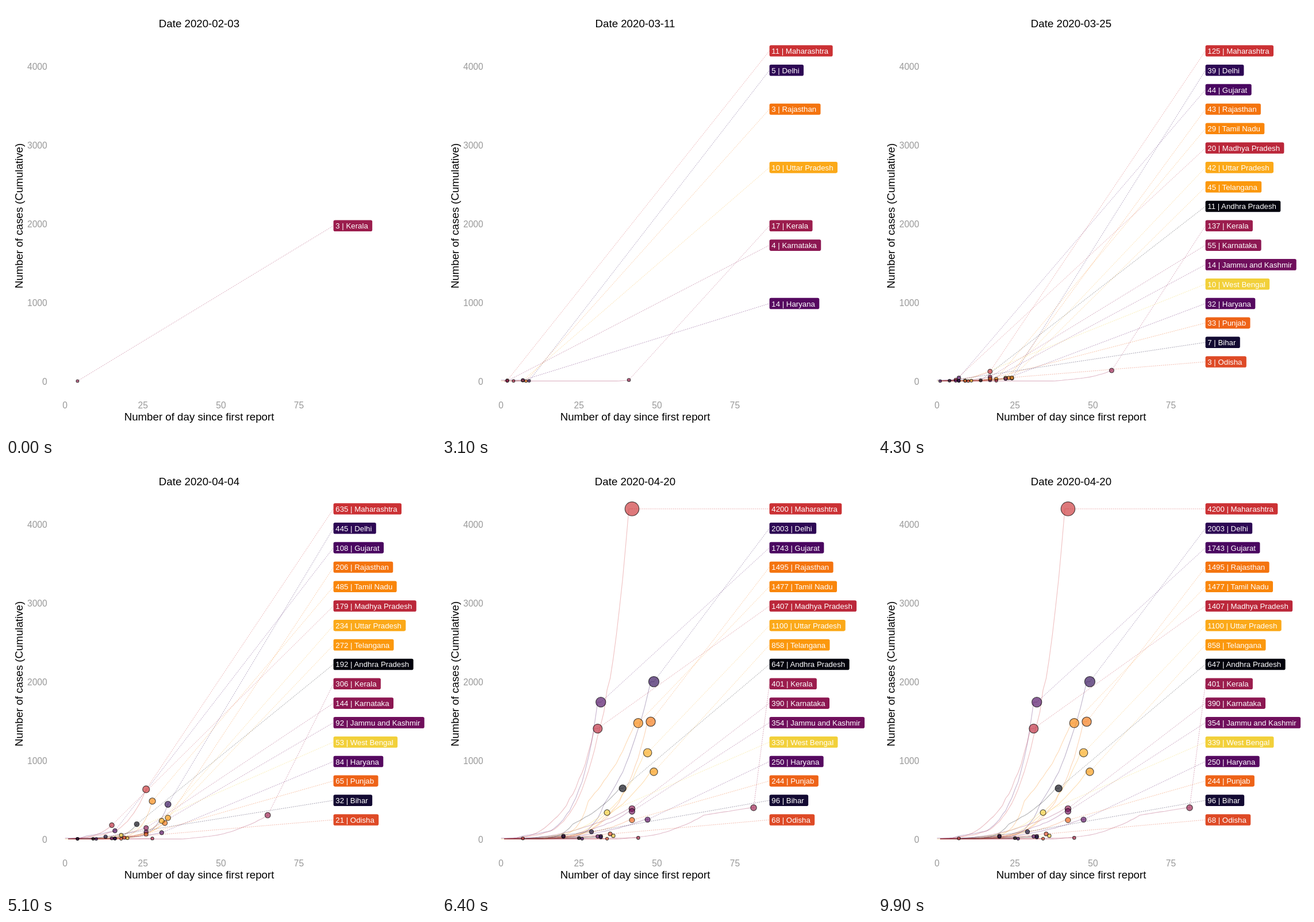
Animation, 748 px wide and 748 px high, one loop 10000 ms. Source, as an HTML page:

```html
<!DOCTYPE html>
<html lang="en">
<head>
<meta charset="utf-8">
<title>Cumulative cases by state</title>
<style>
  html, body { margin: 0; width: 100%; height: 100%; overflow: hidden; background: #fff; }
  svg { display: block; width: 748px; height: 748px; font-family: "Liberation Sans", Arial, sans-serif; }
  .title { font-size: 18.7px; text-anchor: middle; }
  .tick { font-size: 15.6px; fill: #999; text-anchor: middle; }
  .tick.y { text-anchor: end; }
  .curve { fill: none; stroke-width: 1.1; stroke-linejoin: round; opacity: .3; }
  .lead { stroke-width: .85; stroke-dasharray: 1.7 1.7; opacity: .5; }
  .dot { fill-opacity: .65; stroke: #000; stroke-opacity: .65; stroke-width: 1.2; }
  .tag { font-size: 13.25px; fill: #fff; }
</style>
</head>
<body>
<svg id="chart" viewBox="0 0 748 748">
  <text id="date" class="title" x="336" y="37.3"></text>
  <text class="title" x="336" y="721.3">Number of day since first report</text>
  <text class="title" transform="translate(29 365) rotate(-90)">Number of cases (Cumulative)</text>
</svg>
<script>
const FIRST = 4, LAST = 81;               // days after 30 January 2020
const STEP = 100, MOVING = 64, LOOP = 10000;
const KEY_DAYS = [37, 41, 56, 65, 80];
const TAG_X = 569.6, PAD = 3.7, SPACE = 3.68;

const chart = document.getElementById('chart');
const dateText = document.getElementById('date');
const px = day => 102.7 + 5.424 * day;
const py = cases => 652.8 - 0.13685 * cases;

function set(el, attrs) {
  for (const key in attrs) el.setAttribute(key, attrs[key]);
}
function make(parent, tag, attrs = {}) {
  const el = document.createElementNS('http://www.w3.org/2000/svg', tag);
  set(el, attrs);
  return parent.appendChild(el);
}

for (let v = 0; v <= 4000; v += 1000)
  make(chart, 'text', { class: 'tick y', x: 71.7, y: py(v) + 6 }).textContent = v;
for (let d = 0; d <= 75; d += 25)
  make(chart, 'text', { class: 'tick', x: px(d), y: 700 }).textContent = d;

const curves = make(chart, 'g'), leads = make(chart, 'g');
const dots = make(chart, 'g'), tags = make(chart, 'g');
const states = [];

// counts belong to the last KEY_DAYS; offset is the day of the first report
function add(name, color, offset, start, counts, first = 3) {
  const days = KEY_DAYS.slice(-counts.length);
  const s = { name, offset, start, knots: [[start, first], ...counts.map((n, i) => [days[i], n])] };
  s.curve = make(curves, 'path', { class: 'curve', stroke: color });
  s.dot = make(dots, 'circle', { class: 'dot', fill: color });
  s.parts = [s.curve, s.dot];
  if (name) {
    const y = 78 + 33.81 * states.length;
    s.lead = make(leads, 'line', { class: 'lead', stroke: color, x2: TAG_X, y2: y });
    s.tag = make(tags, 'g');
    s.box = make(s.tag, 'rect', { x: TAG_X, y: y - 9.8, height: 19.6, rx: 2.8, fill: color });
    s.text = make(s.tag, 'text', { class: 'tag', x: TAG_X + PAD, y: y + 5 });
    s.parts.push(s.lead, s.tag);
  }
  states.push(s);
}

function noise(seed) {
  const n = Math.sin(seed * 12.9898) * 43758.5453;
  return n - Math.floor(n) - 0.5;
}

// Slowing exponential growth between knots, with uneven daily reports
function casesOn(s, day) {
  const end = s.knots[s.knots.length - 1];
  if (day >= end[0]) return end[1];
  const i = Math.max(1, s.knots.findIndex(k => k[0] >= day));
  const [d0, v0] = s.knots[i - 1], [d1, v1] = s.knots[i];
  const u = (day - d0) / (d1 - d0);
  const eased = u ** 0.9 + 0.12 * u * (1 - u) * noise(day + 100 * s.offset);
  return Math.round(v0 * (v1 / v0) ** eased);
}

add('Maharashtra', '#cb3134', 39, 40, [11, 125, 635, 4200]);
add('Delhi', '#2d0754', 32, 36, [5, 39, 445, 2003]);
add('Gujarat', '#4a0760', 49, 50, [44, 108, 1743]);
add('Rajasthan', '#f4740f', 33, 40, [3, 43, 206, 1495]);
add('Tamil Nadu', '#f9860b', 37, 50, [29, 485, 1477]);
add('Madhya Pradesh', '#bb273a', 50, 51, [20, 179, 1407]);
add('Uttar Pradesh', '#fba919', 34, 34, [10, 42, 234, 1100]);
add('Telangana', '#fb980d', 32, 45, [45, 272, 858]);
add('Andhra Pradesh', '#02020c', 42, 50, [11, 192, 647]);
add('Kerala', '#9b1d4d', 0, 4, [3, 17, 137, 306, 401]);
add('Karnataka', '#8c1752', 39, 40, [4, 55, 144, 390]);
add('Jammu and Kashmir', '#700f5c', 39, 47, [14, 92, 354]);
add('West Bengal', '#f2d03a', 47, 51, [10, 53, 339]);
add('Haryana', '#560960', 34, 34, [14, 32, 84, 250], 14);
add('Punjab', '#ee6318', 39, 50, [33, 65, 244]);
add('Bihar', '#130a32', 52, 54, [7, 32, 96]);
add('Odisha', '#de4a26', 46, 55, [3, 21, 68]);

// smaller regions without a tag: first report, final count, colour
for (const [offset, total, color] of [
  [61, 42, '#7f145e'], [61, 35, '#0d0726'], [56, 15, '#000004'], [55, 7, '#3a0963'],
  [50, 36, '#64106a'], [49, 39, '#4f0b66'], [49, 26, '#1a0a40'], [47, 7, '#e5552f'],
  [45, 44, '#f8c430'], [37, 18, '#ad2345'], [74, 11, '#c83a3a']
]) add('', color, offset, offset + 1, [total]);

function draw(step) {
  const time = FIRST + step * (LAST - FIRST) / MOVING;
  const today = Math.round(time);
  const date = new Date(Date.UTC(2020, 0, 30 + Math.floor(time)));
  dateText.textContent = 'Date ' + date.toISOString().slice(0, 10);

  for (const s of states) {
    const shown = today >= s.start;
    for (const part of s.parts) part.style.display = shown ? '' : 'none';
    if (!shown) continue;

    const points = [];
    for (let day = s.start; day <= today; day++)
      points.push(px(day - s.offset).toFixed(2) + ' ' + py(casesOn(s, day)).toFixed(2));
    const cases = casesOn(s, today);
    const x = px(today - s.offset), y = py(cases);
    set(s.curve, { d: 'M' + points.join('L') });
    set(s.dot, { cx: x, cy: y, r: 2.1 + 10.1 * Math.sqrt(cases / 4200) });
    if (s.name) {
      set(s.lead, { x1: x, y1: y });
      s.text.textContent = cases + ' | ' + s.name;
      set(s.box, { width: s.text.getComputedTextLength() + SPACE + 2 * PAD });
    }
  }
}

const begin = performance.now();
let last = -1;
function tick() {
  const t = (performance.now() - begin) % LOOP;
  const step = Math.min(MOVING, Math.floor(t / STEP));
  if (step !== last) draw(last = step);
  requestAnimationFrame(tick);
}
tick();
</script>
</body>
</html>
```
